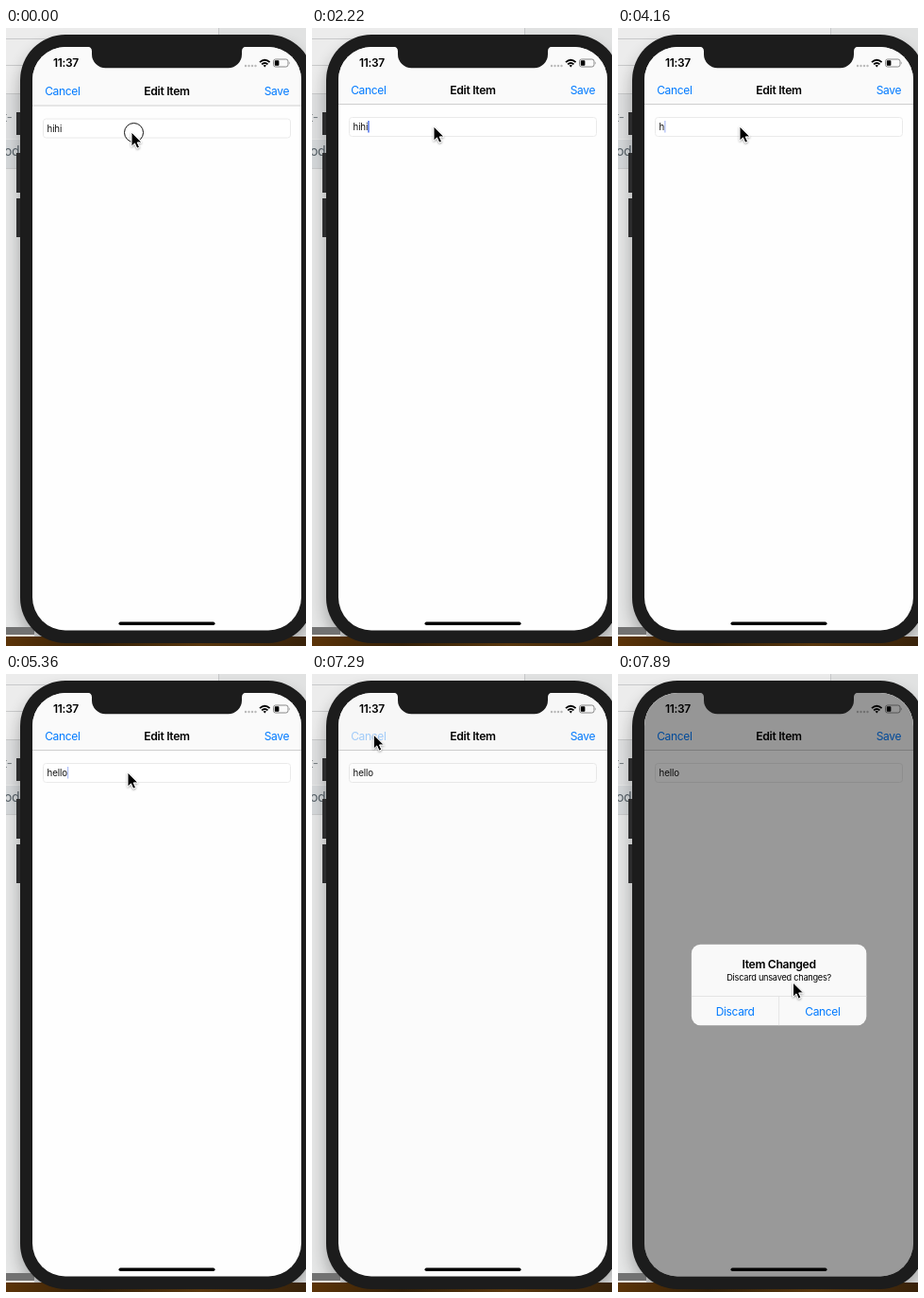
Recreate the animation shown at these times as an HTML page. Size 318 px wide and 653 px high, loop 8000 ms.

```html
<!DOCTYPE html>
<html lang="en">
<head>
<meta charset="utf-8">
<title>Edit Item</title>
<style>
  html, body { margin: 0; width: 100%; height: 100%; overflow: hidden; background: #e6e7e7; }
  svg { display: block; width: 318px; height: 653px; }
  text { font: 12px Inter, Roboto, sans-serif; letter-spacing: -.35px; }
  .bold { font-weight: 600; font-size: 12.2px; }
  .blue { fill: #007aff; }
  .mid { text-anchor: middle; }
  .field { font-size: 9.7px; letter-spacing: -.1px; }
  .small { font-size: 9.2px; letter-spacing: -.25px; }
</style>
</head>
<body>
<svg viewBox="0 0 318 653">
  <defs>
    <linearGradient id="wood">
      <stop offset="0" stop-color="#5c3408"/>
      <stop offset=".3" stop-color="#332008"/>
      <stop offset=".65" stop-color="#5a380e"/>
      <stop offset="1" stop-color="#38220a"/>
    </linearGradient>
    <clipPath id="screen"><rect x="28" y="20" width="285" height="616.4" rx="35"/></clipPath>
    <filter id="soft" x="-50%" y="-50%" width="200%" height="200%">
      <feDropShadow dx="0" dy="1" stdDeviation=".8" flood-opacity=".4"/>
    </filter>
    <filter id="glow" x="-20%" width="140%"><feGaussianBlur stdDeviation="9"/></filter>
  </defs>

  <!-- desktop behind the phone -->
  <path fill="#ececec" d="M0 0h225v70H0z"/>
  <path fill="#e1e2e2" d="M226 0h92v70h-92z"/>
  <path fill="#dfe0e1" d="M0 70h20v47H0z"/>
  <path fill="#d5d8da" d="M0 118h20v30H0z"/>
  <path stroke="#c8c9ca" fill="none" d="M225.5 0v12M0 11.5h60M0 39.5h20M0 69.5h20M0 148.5h20"/>
  <text x="-3" y="99" fill="#777e82" style="font-size:13px">t-</text>
  <text x="-2" y="135" fill="#566067" style="font-size:14px">od</text>
  <rect x="15" y="18" width="311" height="640" rx="48" opacity=".3" filter="url(#glow)"/>
  <path fill="#727272" d="M0 633h30v8H0z"/>
  <path fill="#e4e0da" d="M0 641h30v2H0z"/>
  <path fill="url(#wood)" d="M0 643h318v10H0z"/>

  <!-- phone -->
  <path fill="#2c2c2d" d="M11 89h6v24h-6zM11 132h6v42h-6zM11 180h6v41h-6z"/>
  <rect x="15" y="7" width="311" height="643" rx="48" fill="#1c1c1c"/>
  <g clip-path="url(#screen)">
    <path fill="#fefefe" d="M28 20h285v617H28z"/>
    <g id="page">
      <path fill="#fafafa" d="M28 16h285v64H28z"/>
      <path stroke="#cfcfcf" d="M28 80.5h285"/>
      <text id="cancel" class="blue" x="41.2" y="69.5">Cancel</text>
      <text class="bold mid" x="170.5" y="69.5">Edit Item</text>
      <text class="blue" x="273.7" y="69.5">Save</text>
      <rect x="39.5" y="94.5" width="262" height="20" rx="3" fill="#fff" stroke="#eaeaea"/>
      <text id="value" class="field" x="43.5" y="108"></text>
      <rect id="caret" y="98" width="1.4" height="12.5" fill="#4268e8"/>
    </g>
    <text class="bold" x="50" y="41.2" style="font-size:12px">11:37</text>
    <path stroke="#bbb" stroke-width="2.4" stroke-linecap="round" stroke-dasharray="0 3.5" d="M254 40h11"/>
    <path fill="none" stroke="#000" stroke-width="1.8" d="M269 36.2q5.3-5 10.6 0M271.1 38.4q3.2-2.8 6.4 0"/>
    <path d="M272.6 39.6q1.7-1.3 3.4 0l-1.7 1.8z"/>
    <rect x="283.5" y="33" width="15.5" height="8" rx="2.2" fill="none" stroke="#888"/>
    <rect x="284.8" y="34.3" width="4.6" height="5.4" rx=".8"/>
    <path fill="#888" d="M300 35.5q1.5 1.5 0 3z"/>
    <path id="dim" d="M28 20h285v617H28z"/>
  </g>
  <path fill="#1c1c1c" d="M86 19.5q5 .5 5 5v3.3a14.5 14.5 0 0 0 14.500 14.500h130a14.500 14.500 0 0 0 14.500-14.500v-3.300q0-4.500 5-5z"/>
  <rect x="119.500" y="627.500" width="102" height="3.500" rx="1.750"/>

  <!-- alert, drawn around its own centre -->
  <g id="alert">
    <rect x="-92.700" y="-42.700" width="185.400" height="85.400" rx="9.500" fill="#f9f9f9"/>
    <path stroke="#dfdfdf" stroke-width=".8" d="M-92.700 12H92.700M0 12V42.700"/>
    <text class="bold mid" y="-17.700">Item Changed</text>
    <text class="small mid" y="-4.300">Discard unsaved changes?</text>
    <text class="blue mid" x="-46.500" y="32">Discard</text>
    <text class="blue mid" x="46.300" y="32">Cancel</text>
  </g>

  <circle id="press" cx="135.500" cy="110.500" r="10" fill="none" stroke="#111"/>
  <path id="pointer" filter="url(#soft)" stroke="#fff" d="M0 0V15.200l3.500-3.300 2.300 5.300 2.700-1.200-2.300-5.100h4.800z"/>
</svg>
<script>
const LOOP = 8000, BEAT = 148; // the screen refreshes once per beat
const OLD = "hihi", NEW = "hello", HINT = "Add things to do ...";
// Beats at which things begin
const FOCUS = 4, ERASE = 15, FIRST_KEY = 28, TYPE = 32, TAP = 48, ALERT = 50;

const $ = id => document.getElementById(id);
const set = (id, attrs) => Object.entries(attrs).forEach(([k, v]) => $(id).setAttribute(k, v));
const clamp = (v, lo, hi) => Math.min(hi, Math.max(lo, v));

const typed = b => b < FIRST_KEY
  ? OLD.slice(0, OLD.length - clamp(b - ERASE, 0, OLD.length))
  : NEW.slice(0, 1 + clamp(b - TYPE, 0, NEW.length - 1));

function lastKey(b) {
  if (b <= ERASE) return FOCUS;
  if (b < FIRST_KEY) return Math.min(b, ERASE + OLD.length);
  return b <= TYPE ? FIRST_KEY : Math.min(b, TYPE + NEW.length - 1);
}

// Solid for four beats after a key, then fades out and in every seven.
function caretAlpha(b) {
  if (b < FOCUS - 1 || b >= TAP) return 0;
  const phase = (b - lastKey(b) + 3) % 7;
  return phase < 3 || b < lastKey(b) ? 1 : phase % 3 ? 0 : .4;
}

// Each move: first beat, last beat, destination
const moves = [[0, 3, 129, 104], [40, 44, 243, 78], [44, 47, 65.3, 64], [ALERT, 53, 185.5, 326]];

function pointerAt(b) {
  let x = 133, y = 110;
  for (const [from, to, toX, toY] of moves) {
    const p = clamp((b - from) / (to - from), 0, 1), ease = p * p * (3 - 2 * p);
    x += (toX - x) * ease;
    y += (toY - y) * ease;
  }
  return [x, y];
}

function draw(t) {
  const b = Math.floor(t / BEAT), text = typed(b), value = $("value");
  const settle = Math.exp(-1.8 * Math.max(0, b - ALERT)), open = b >= ALERT;
  value.textContent = text || HINT;
  set("value", { fill: text ? "#111" : "#c9c9cc" });
  set("caret", { x: 43.5 + (text && value.getComputedTextLength()), opacity: caretAlpha(b) });
  set("page", { transform: `translate(0 ${1.5 * clamp(1 - b / 3, 0, 1) ** 2})` });
  set("cancel", { opacity: b >= TAP && !open ? .35 : 1 });
  set("dim", { opacity: open ? .4 - .07 * settle : b > TAP ? .01 : 0 });
  set("alert", {
    transform: `translate(170.6 328.5) scale(${1 + .036 * settle})`,
    opacity: open ? 1 - .13 * settle : 0
  });
  set("press", { opacity: b < 1 ? 1 : 0 });
  set("pointer", { transform: `translate(${pointerAt(b)})` });
}

const start = performance.now();
function tick() {
  draw((performance.now() - start) % LOOP);
  requestAnimationFrame(tick);
}
tick();
</script>
</body>
</html>
```
